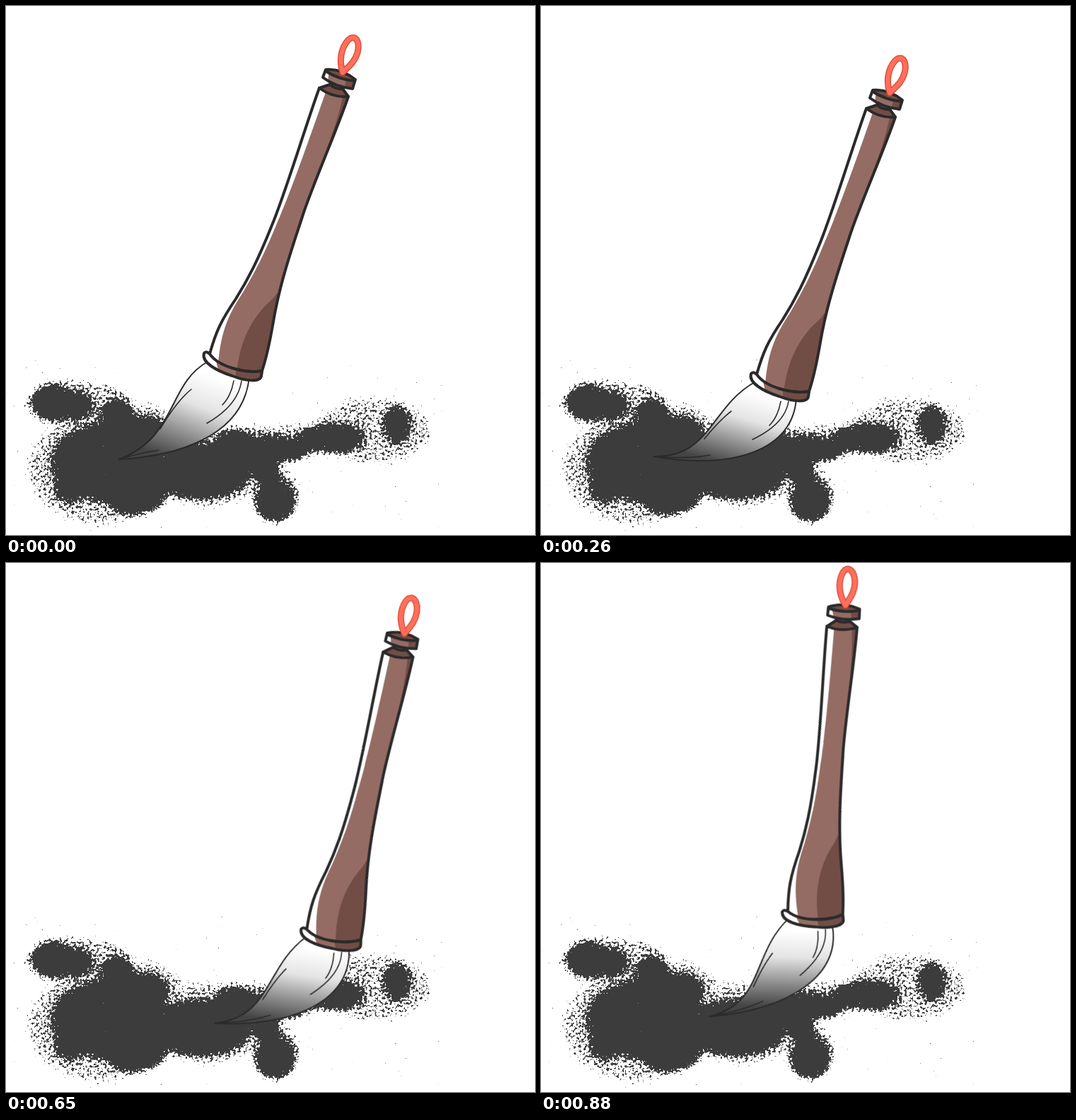
An HTML page without scripts that plays this animation: 748x748 px, repeating every 1.01 s.

```html
<!DOCTYPE html>
<html lang="en">
<head>
<meta charset="utf-8">
<title>Ink brush</title>
<style>
  html, body { margin: 0; width: 100%; height: 100%; overflow: hidden; background: #fff; }
  svg { display: block; width: 100vw; height: 100vh; }

  .line { fill: none; stroke: #2b2a2a; stroke-width: 4; stroke-linecap: round; stroke-linejoin: round; }
  .wood { fill: #946c64; }
  .shade { fill: #724d46; }

  .brush, .bristles, .hairs { animation: 1010ms step-end infinite; }
  .brush { animation-name: stroke; transform-origin: 320px 508px; }
  .bristles { animation-name: press; fill: url(#wet); stroke: #2b2a2a; stroke-width: 2; stroke-linejoin: round; }
  .hairs { animation-name: fan; fill: none; stroke: #2b2a2a; stroke-width: 1.6; stroke-linecap: round; }

  /* Dip in two steps, sweep right, then tilt upright and swing back */
  @keyframes stroke {
    0%     { transform: none; animation-timing-function: steps(2); }
    25.74% { transform: translate(17px, 29px); }
    38.61% { transform: translate(65px, 29px); }
    51.48% { transform: translate(120px, 37px); }
    64.35% { transform: translate(139px, 22px) rotate(-7deg); }
    74.25% { transform: translate(147px, 7px) rotate(-9.2deg); }
    87.12%, 100% { transform: translate(64px, -8px) rotate(-14.6deg); }
  }
  @keyframes press {
    0% {
      d: path("M285 503C228 535 242 610 160 641C235 637 336 612 344 524Z");
      animation-timing-function: steps(2);
    }
    25.74%, 100% { d: path("M285 503C223 538 223 609 143 608C253 627 341 600 344 524Z"); }
  }
  @keyframes fan {
    0% {
      d: path("M262 542Q242 558 218 598M333 530Q328 565 284 590M322 530Q318 552 306 564M216 628Q190 632 163 640");
      animation-timing-function: steps(2);
    }
    25.74%, 100% {
      d: path("M252 544Q236 556 214 583M333 530Q328 562 282 584M322 530Q318 552 306 564M222 606Q190 612 146 608");
    }
  }
</style>
</head>
<body>
<svg viewBox="0 0 748 748">
  <defs>
    <linearGradient id="wet" x1=".72" y1=".15" x2=".3" y2=".95">
      <stop offset="0" stop-color="#fff"/>
      <stop offset=".35" stop-color="#e4e4e4"/>
      <stop offset=".7" stop-color="#8c8c8c"/>
      <stop offset="1" stop-color="#444"/>
    </linearGradient>
    <!-- Blurred opacity plus noise, cut at a threshold: paler means sparser grains -->
    <filter id="spatter" filterUnits="userSpaceOnUse" x="0" y="500" width="640" height="248" color-interpolation-filters="sRGB">
      <feGaussianBlur in="SourceAlpha" stdDeviation="6" result="soft"/>
      <feTurbulence type="fractalNoise" baseFrequency=".28" numOctaves="3" seed="7"/>
      <feComposite in2="soft" operator="arithmetic" k2="1" k3=".8" k4="-.38"/>
      <feColorMatrix values="0 0 0 0 .235  0 0 0 0 .235  0 0 0 0 .235  0 0 0 20 -9.5"/>
    </filter>
    <path id="shaft" d="M443 116C425 165 395 265 376 310C356 360 342 387 325 414C304 445 297 460 288 492C300 510 338 520 362 516C373 483 376 455 381 430C389 390 400 355 419 298C430 262 470 170 484 128Z"/>
    <path id="cap" d="M452 90Q474 88 494 104L490 117Q465 114 448 101Z"/>
    <path id="ring" d="M280 491C276 504 298 516 320 523C340 531 360 532 361 523Q362 517 362 516C338 520 300 510 288 492Q283 487 280 491Z"/>
    <path id="loop" d="M476 94C471 78 473 60 484 48C494 39 501 50 497 66C493 80 484 86 476 94Z"/>
    <clipPath id="inShaft"><use href="#shaft"/></clipPath>
    <clipPath id="inCap"><use href="#cap"/></clipPath>
    <clipPath id="inRing"><use href="#ring"/></clipPath>
  </defs>

  <g filter="url(#spatter)">
    <g opacity=".36">
      <ellipse cx="105" cy="562" rx="78" ry="33"/>
      <ellipse cx="130" cy="655" rx="100" ry="78"/>
      <ellipse cx="205" cy="600" rx="45" ry="35"/>
      <ellipse cx="285" cy="650" rx="85" ry="58"/>
      <ellipse cx="380" cy="690" rx="36" ry="40"/>
      <ellipse cx="380" cy="615" rx="85" ry="24"/>
      <ellipse cx="520" cy="600" rx="82" ry="46"/>
    </g>
    <ellipse cx="65" cy="560" rx="28" ry="26"/>
    <ellipse cx="96" cy="565" rx="27" ry="19"/>
    <ellipse cx="157" cy="580" rx="23" ry="23"/>
    <ellipse cx="198" cy="606" rx="31" ry="25"/>
    <ellipse cx="145" cy="645" rx="80" ry="54"/>
    <ellipse cx="90" cy="676" rx="20" ry="26"/>
    <ellipse cx="183" cy="685" rx="45" ry="34"/>
    <ellipse cx="275" cy="657" rx="70" ry="39"/>
    <ellipse cx="323" cy="620" rx="26" ry="21"/>
    <ellipse cx="365" cy="628" rx="65" ry="19"/>
    <ellipse cx="460" cy="611" rx="47" ry="20"/>
    <ellipse cx="367" cy="658" rx="18" ry="16"/>
    <ellipse cx="381" cy="699" rx="27" ry="30"/>
    <ellipse cx="553" cy="592" rx="18" ry="25"/>
  </g>

  <g class="brush">
    <path class="bristles"/>
    <path class="hairs"/>

    <path class="line" style="fill:#724d46" d="M461 106L459 116L475 120L478 111Z"/>
    <g clip-path="url(#inShaft)">
      <use href="#shaft" fill="#fff"/>
      <path class="wood" d="M454 116C437 165 405 257 384 305C364 354 352 376 335 405C312 440 302 465 299 520H400L500 112Z"/>
      <path class="shade" d="M477 124C472 150 462 180 446 225L490 140ZM384 405C377 416 370 419 361 430C341 455 330 480 325 525H390Z"/>
    </g>
    <use href="#shaft" class="line"/>
    <path class="line" style="fill:#724d46" d="M443 116L458 111Q466 118 476 117L484 128Q462 130 443 116Z"/>
    <g clip-path="url(#inCap)">
      <use href="#cap" class="wood"/>
      <path fill="#fff" d="M446 86H457L455 110H444Z"/>
      <path class="shade" d="M450 86H500V106Q470 102 450 92ZM482 100H498V120H478Z"/>
    </g>
    <use href="#cap" class="line"/>
    <path class="line" d="M452 92Q470 104 493 106"/>
    <g clip-path="url(#inRing)">
      <use href="#ring" class="wood"/>
      <path fill="#fff" d="M270 480H292L300 515H270Z"/>
      <path class="shade" d="M325 510H370V535H325Z"/>
    </g>
    <use href="#ring" class="line"/>
    <g fill="none" stroke-linejoin="round">
      <use href="#loop" stroke="#d8432f" stroke-width="9"/>
      <use href="#loop" stroke="#ff6f5b" stroke-width="6.5"/>
    </g>
  </g>
</svg>
</body>
</html>
```
